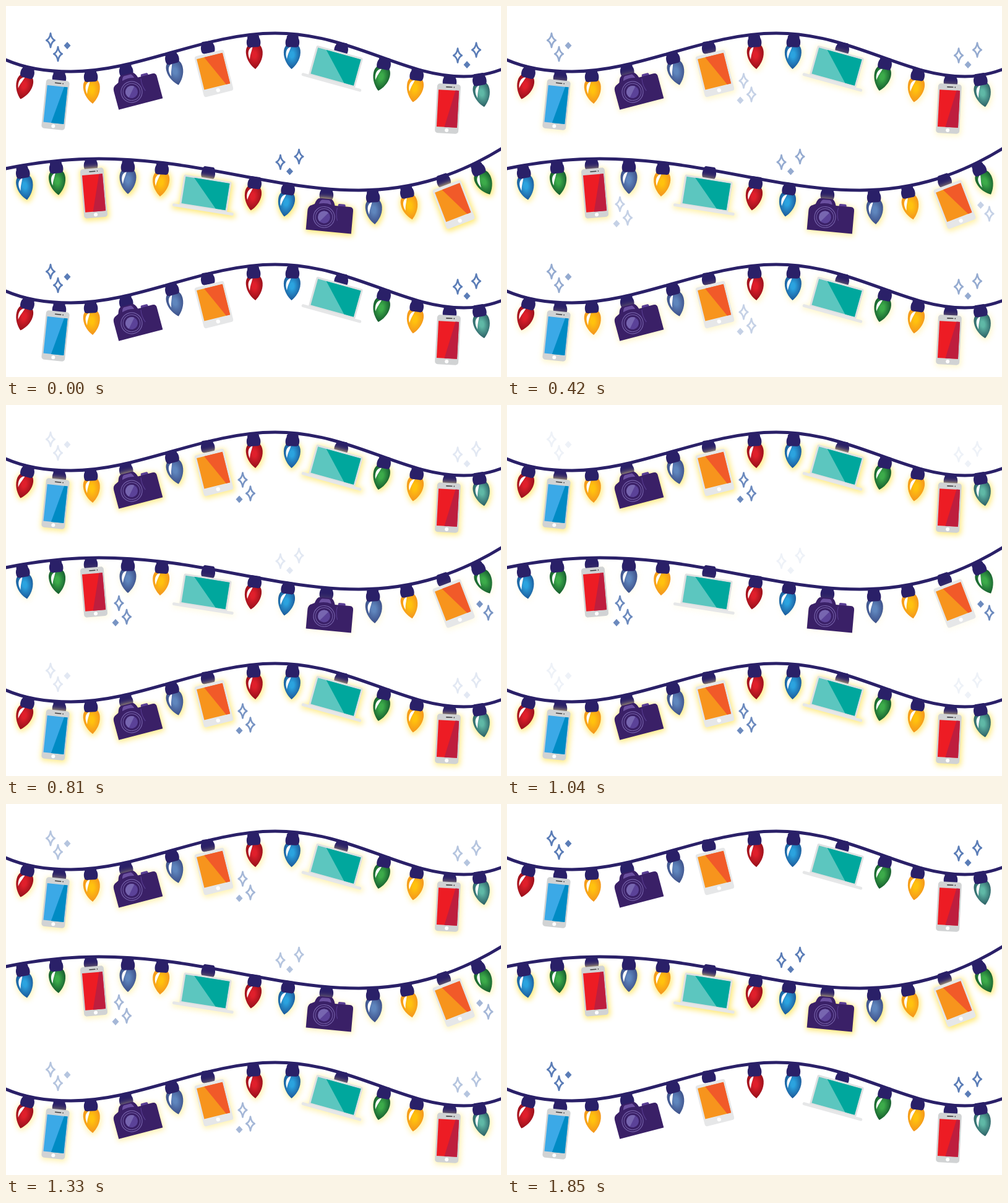
An HTML page without scripts for the animation above (1980 ms loop, 800 by 600 pixels).

```html
<!DOCTYPE html>
<html lang="en">
<head>
<meta charset="utf-8">
<title>Festive gadget lights</title>
<style>
  html, body { margin: 0; width: 100%; height: 100%; overflow: hidden; background: #fff; }
  svg { display: block; width: 100vw; height: 100vh; }
  .fade { animation: fade 1.98s linear infinite; }
  .grow { animation: grow 1.98s linear infinite; }
  /* bulb sockets cast no glow */
  .glow { --socket: hidden; filter: url(#halo); }
  .socket { visibility: var(--socket, visible); }
  .wire { fill: none; stroke: #2a2068; stroke-width: 5; }
  .blue { fill: #3ba9e7; color: #008bc4; }
  .red { fill: #ed1c24; color: #be1e3e; }
  @keyframes fade { 0%, 6.5% { opacity: 1 } 48.2% { opacity: 0 } 90.4%, 100% { opacity: 1 } }
  @keyframes grow { 0%, 6.5% { opacity: 0 } 48.2% { opacity: 1 } 90.4%, 100% { opacity: 0 } }
</style>
</head>
<body>
<svg viewBox="0 0 800 600">
  <defs>
    <filter id="halo" filterUnits="userSpaceOnUse" x="-20" y="0" width="840" height="620" color-interpolation-filters="sRGB">
      <feMorphology in="SourceAlpha" operator="dilate" radius="1.5"/>
      <feOffset dx="1" dy="2"/>
      <feGaussianBlur stdDeviation="4" result="soft"/>
      <feFlood flood-color="#ffea7c"/>
      <feComposite in2="soft" operator="in"/>
    </filter>

    <radialGradient id="ruby" cy=".45" r=".55"><stop offset=".2" stop-color="#e01f2b"/><stop offset="1" stop-color="#930f1a"/></radialGradient>
    <radialGradient id="amber" cy=".45" r=".55"><stop offset=".2" stop-color="#ffc20e"/><stop offset="1" stop-color="#f3931e"/></radialGradient>
    <radialGradient id="azure" cy=".45" r=".55"><stop offset=".2" stop-color="#2ba3df"/><stop offset="1" stop-color="#1b5797"/></radialGradient>
    <radialGradient id="slate" cy=".45" r=".55"><stop offset=".2" stop-color="#5f86bd"/><stop offset="1" stop-color="#3b4d86"/></radialGradient>
    <radialGradient id="green" cy=".45" r=".55"><stop offset=".2" stop-color="#3cab4a"/><stop offset="1" stop-color="#13582c"/></radialGradient>
    <radialGradient id="teal" cy=".45" r=".55"><stop offset=".2" stop-color="#5fb8a6"/><stop offset="1" stop-color="#2a5c62"/></radialGradient>

    <path id="cap" fill="#2a2068" d="M-7-10H7Q10-9 9.500-5C11.500-2 12 4 10 8Q8 10 5 9.500H-5Q-8 10-10 8C-12 4-11.500-2-9.500-5Q-10-9-7-10Z"/>

    <g id="bulb">
      <path d="M0 45C-6 40-13.500 30-13.500 18C-13.500 8-8 3 0 3S13.500 8 13.500 18C13.500 30 6 40 0 45Z"/>
      <path fill="#fff" d="M-2 9C-10 11-11.500 20-8 29C-7 21-4 16-2 9Z"/>
      <use href="#cap" class="socket"/>
    </g>

    <g id="phone">
      <rect x="-19" y="-40" width="38" height="80" rx="4.500" fill="#d1d3d4"/>
      <path d="M-16.500-30h33v60h-33z"/>
      <path fill="currentColor" d="M11-30h5.500v60H-4z"/>
      <path d="M-4-35H5" stroke="#414042" stroke-width="1.600" stroke-linecap="round"/>
      <circle cx="8.500" cy="-35" r=".9" fill="#414042"/>
      <circle cy="35" r="3" fill="#fff"/>
    </g>

    <g id="tablet">
      <rect x="-24.500" y="-34" width="49" height="68" rx="4" fill="#e6e7e8"/>
      <path fill="#f7941d" d="M-21.500-29h43v51h-43z"/>
      <path fill="#f15a29" d="M-9-29H21.500V22H15z"/>
      <circle cy="28" r="3.200" fill="#fff"/>
    </g>

    <g id="laptop">
      <rect x="-39" y="-25" width="78" height="51" rx="3" fill="#dfe1e2"/>
      <path fill="#5cc6bf" d="M-36-22h72v44h-72z"/>
      <path fill="#00a79d" d="M-22-22h58v44H20z"/>
      <rect x="-50" y="24" width="100" height="4.800" rx="2.200" fill="#e6e7e8"/>
    </g>

    <g id="camera">
      <rect x="21" y="-23.500" width="12" height="6" rx="2" fill="#5b3f94"/>
      <path fill="#3a2067" d="M-27.500 22.500V-8Q-27.500-16-21-18L-17-20Q-14-30-9-30H8Q13-30 16-20H40Q46-20 46-14V23Z"/>
      <path fill="#6b50a0" d="M-10-21Q-8-28-5-28H5Q8-28 10-21Q0-24-10-21Z"/>
      <path d="M20-17Q18-6 22 4" fill="none" stroke="#5b3f94"/>
      <circle r="17" fill="#3a2067" stroke="#7460a8" stroke-width="1.200"/>
      <circle r="13.800" fill="#3a2067" stroke="#7460a8"/>
      <circle r="10" fill="#5b4298"/>
      <path fill="#7766b0" d="M-6.500 7.600A10 10 0 0 1 6.500-7.600Z"/>
    </g>

    <path id="star" d="M0-11.500Q1.200-2.500 6.800 0Q1.200 2.500 0 11.500Q-1.200 2.500-6.800 0Q-1.200-2.500 0-11.500Z" fill="#fff" stroke="#5b7db7" stroke-width="2.600" stroke-linejoin="round"/>
    <path id="gem" d="M0-6L5.500 0L0 6L-5.500 0Z" fill="#5b7db7"/>
    <g id="falling">
      <use href="#star"/><use href="#star" x="12.500" y="22"/><use href="#gem" x="-5.500" y="31.500"/>
    </g>
    <g id="rising">
      <use href="#star"/><use href="#star" x="30" y="-9"/><use href="#gem" x="15" y="15"/>
    </g>

    <g id="outer-line">
      <path class="wire" d="M-5 85C30 101 65 106 105 106C215 106 320 44 435 44C558 44 640 114 740 114C762 114 782 110 805 101"/>
      <use href="#cap" transform="translate(86 115)"/>
      <use href="#cap" transform="translate(194 104) rotate(-8)"/>
      <use href="#cap" transform="translate(326 67) rotate(-8)"/>
      <use href="#cap" transform="translate(542 69) rotate(10)"/>
      <use href="#cap" transform="translate(717 121)"/>
    </g>
    <g id="outer-items">
      <use href="#bulb" fill="url(#ruby)" transform="translate(35 107) rotate(15)"/>
      <use href="#phone" class="blue" transform="translate(80 159.500) rotate(6)"/>
      <use href="#bulb" fill="url(#amber)" transform="translate(137 113) rotate(-4)"/>
      <use href="#camera" transform="translate(203 139) rotate(-15)"/>
      <use href="#bulb" fill="url(#slate)" transform="translate(268 84) rotate(-14)"/>
      <use href="#tablet" transform="translate(336 109) rotate(-14)"/>
      <use href="#bulb" fill="url(#ruby)" transform="translate(400 57) rotate(-4)"/>
      <use href="#bulb" fill="url(#azure)" transform="translate(463 57) rotate(2)"/>
      <use href="#laptop" transform="translate(533 98) rotate(15.500)"/>
      <use href="#bulb" fill="url(#green)" transform="translate(611 93) rotate(12)"/>
      <use href="#bulb" fill="url(#amber)" transform="translate(664 111) rotate(8)"/>
      <use href="#phone" class="red" transform="translate(714 166) rotate(3)"/>
      <use href="#bulb" fill="url(#teal)" transform="translate(765 119) rotate(-10)"/>
    </g>

    <g id="inner-line">
      <path class="wire" d="M-5 264C45 253 95 247 150 247C312 247 432 298 570 298C660 298 735 272 805 228"/>
      <use href="#cap" transform="translate(137 256)"/>
      <use href="#cap" transform="translate(327 270) rotate(8)"/>
      <use href="#cap" transform="translate(518 304) rotate(4)"/>
      <use href="#cap" transform="translate(707 282) rotate(-18)"/>
    </g>
    <g id="inner-items">
      <use href="#bulb" fill="url(#azure)" transform="translate(27 269) rotate(-9)"/>
      <use href="#bulb" fill="url(#green)" transform="translate(81 261) rotate(-5)"/>
      <use href="#phone" class="red" transform="translate(142 302.500) rotate(-5)"/>
      <use href="#bulb" fill="url(#slate)" transform="translate(197 259)"/>
      <use href="#bulb" fill="url(#amber)" transform="translate(252 263) rotate(4)"/>
      <use href="#laptop" transform="translate(322.500 303) rotate(9)"/>
      <use href="#bulb" fill="url(#ruby)" transform="translate(402 286) rotate(8)"/>
      <use href="#bulb" fill="url(#azure)" transform="translate(456 296) rotate(8)"/>
      <use href="#camera" transform="translate(514 341.500) rotate(5)"/>
      <use href="#bulb" fill="url(#slate)" transform="translate(593 308) rotate(-4)"/>
      <use href="#bulb" fill="url(#amber)" transform="translate(648 301) rotate(-11)"/>
      <use href="#tablet" transform="translate(723.500 321) rotate(-21)"/>
      <use href="#bulb" fill="url(#green)" transform="translate(763 264) rotate(-25)"/>
    </g>
  </defs>

  <use href="#outer-line"/>
  <use href="#inner-line"/>
  <use href="#outer-line" y="374"/>

  <g class="glow grow">
    <use href="#outer-items"/>
    <use href="#outer-items" y="374"/>
  </g>
  <g class="glow fade"><use href="#inner-items"/></g>

  <use href="#outer-items"/>
  <use href="#inner-items"/>
  <use href="#outer-items" y="374"/>

  <g class="fade">
    <g id="corner-left">
      <use href="#star" x="72" y="55.500"/><use href="#star" x="84" y="77.500"/><use href="#gem" x="99" y="64"/>
    </g>
    <use href="#corner-left" y="374"/>
    <use href="#rising" x="730" y="80"/>
    <use href="#rising" x="730" y="454"/>
    <use href="#rising" x="443.500" y="252.500"/>
  </g>
  <g class="grow">
    <use href="#falling" x="382.500" y="121"/>
    <use href="#falling" x="382.500" y="495"/>
    <use href="#falling" x="182.500" y="320.500"/>
    <use href="#star" x="779.500" y="336"/>
    <use href="#gem" x="765.500" y="322"/>
  </g>
</svg>
</body>
</html>
```
